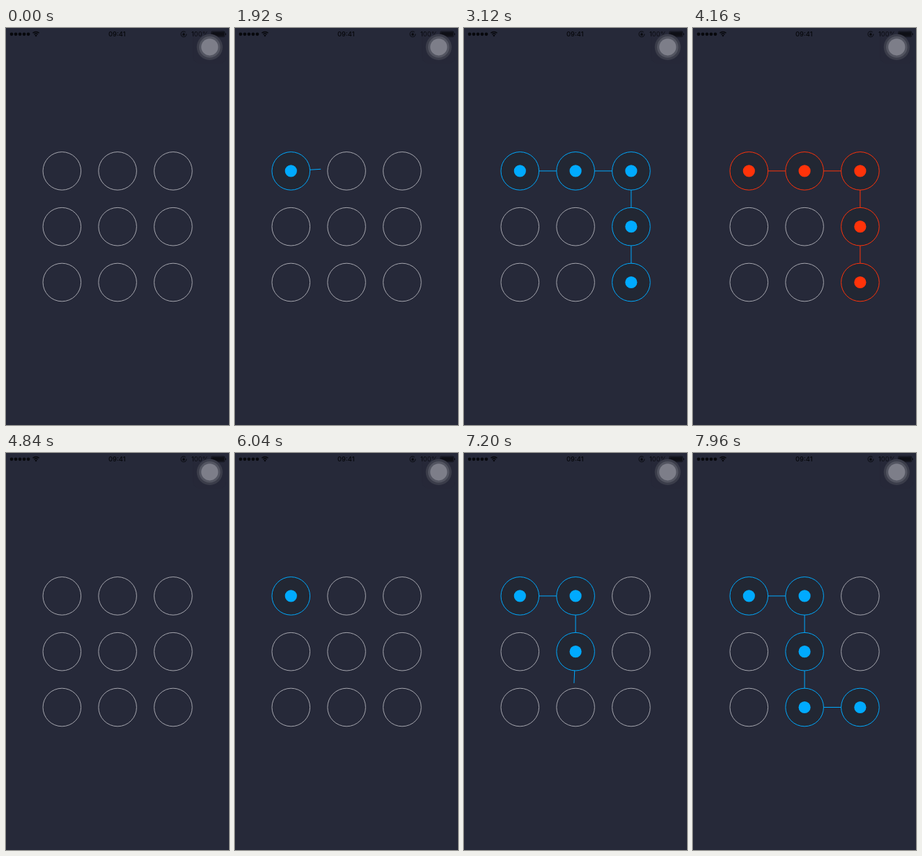
Animation of 320 by 569 pixels, one loop 8000 ms. Source, as an HTML page with a canvas:

```html
<!DOCTYPE html>
<html lang="en">
<head>
<meta charset="utf-8">
<title>Pattern lock</title>
<style>
  html, body { margin: 0; width: 100%; height: 100%; overflow: hidden; background: #262939; }
  canvas { display: block; width: 320px; height: 569px; }
</style>
</head>
<body>
<canvas id="stage"></canvas>
<script>
const W = 320, H = 569, LOOP = 8000, TICK = 40;
const STEP = 79.8, RADIUS = 27.3, BOW = 3.5;
const BG = '#262939', IDLE = '#a6a7af', BLUE = '#00aaff', RED = '#ff330a', FILL = '#222733', INK = '#07080c';
const RIGHT = 1, DOWN = 3;

const canvas = document.getElementById('stage');
const ctx = canvas.getContext('2d');
const dpr = window.devicePixelRatio || 1;
canvas.width = W * dpr;
canvas.height = H * dpr;

// Each gesture touches the first node, then makes eased strokes across `count` nodes.
const gestures = [
  {
    start: 1360, fail: 3400, end: 4760,
    strokes: [
      { at: 1693, ms: 667, dir: RIGHT, count: 2 },
      { at: 2370, ms: 840, dir: DOWN, count: 2 }
    ]
  },
  {
    start: 6040, fail: Infinity, end: LOOP,
    strokes: [
      { at: 6225, ms: 545, dir: RIGHT, count: 1 },
      { at: 6814, ms: 552, dir: DOWN, count: 2 },
      { at: 7548, ms: 545, dir: RIGHT, count: 1 }
    ]
  }
];

const node = i => [160.1 + STEP * (i % 3 - 1), 284.7 + STEP * (Math.floor(i / 3) - 1)];
const clamp = u => Math.min(1, Math.max(0, u));
const ease = u => u * u * (3 - 2 * u);

// Visited nodes and, while a stroke is under way, the slightly bowed finger position.
function trace(gesture, t) {
  const visited = [0];
  let from = 0, finger = null;
  for (const { at, ms, dir, count } of gesture.strokes) {
    if (t < at) break;
    const u = ease(clamp((t - at) / ms)), travel = u * count;
    for (let k = 1; k <= count; k++) {
      if (travel >= k - RADIUS / STEP) visited.push(from + k * dir);
    }
    const [x, y] = node(from), bow = BOW * Math.sin(Math.PI * u), move = travel * STEP;
    finger = u === 1 ? null : dir === RIGHT ? [x + move, y - bow] : [x - bow, y + move];
    from += count * dir;
  }
  return { visited, finger };
}

function disc(x, y, r, fill) {
  ctx.beginPath();
  ctx.arc(x, y, r, 0, 2 * Math.PI);
  ctx.fillStyle = fill;
  ctx.fill();
}

function arc(x, y, r, from, to, width, color) {
  ctx.beginPath();
  ctx.arc(x, y, r, from, to);
  ctx.lineWidth = width;
  ctx.strokeStyle = color;
  ctx.stroke();
}

function box(x, y, w, h, r, fill) {
  ctx.beginPath();
  ctx.roundRect(x, y, w, h, r);
  ctx.fillStyle = fill;
  ctx.fill();
}

function label(text, x, weight) {
  ctx.font = `${weight} 9.4px Inter, Roboto, sans-serif`;
  ctx.textAlign = 'center';
  ctx.textBaseline = 'middle';
  ctx.fillStyle = INK;
  ctx.fillText(text, x, 9.2);
}

function drawStatus() {
  for (let i = 0; i < 5; i++) disc(8 + 6 * i, 8.8, 2.4, INK);

  const up = -Math.PI / 2, spread = 0.76;
  for (const r of [3.8, 6.6]) arc(43, 12, r, up - spread, up + spread, 1.5, INK);
  ctx.beginPath();
  ctx.moveTo(43, 12.4);
  ctx.arc(43, 12.4, 2.4, up - spread, up + spread);
  ctx.fillStyle = INK;
  ctx.fill();

  label('09:41', 159.3, 500);

  arc(255, 8.8, 3.9, -0.1, 5.5, 0.9, INK);
  box(253.4, 8.2, 3.2, 2.6, 0.4, INK);
  arc(255, 8.2, 1.1, Math.PI, 2 * Math.PI, 0.7, INK);

  label('100%', 278.4, 400);

  ctx.beginPath();
  ctx.roundRect(294.5, 4.9, 19.4, 7.8, 1.6);
  ctx.lineWidth = 0.8;
  ctx.strokeStyle = INK;
  ctx.stroke();
  box(295.4, 5.8, 17.6, 6, 0.8, INK);
  box(314.6, 7.4, 1.2, 2.8, 0.6, INK);
}

function drawTouchButton() {
  box(268.5, 4, 47.5, 47, 9, 'rgba(36, 38, 52, 0.25)');
  disc(292.3, 27.3, 18.6, '#3b3d4a');
  disc(292.3, 27.3, 15.3, '#535561');
  disc(292.3, 27.3, 12.1, '#7d7e89');
}

function drawPattern(t) {
  const gesture = gestures.find(g => t >= g.start && t < g.end);
  const { visited, finger } = gesture ? trace(gesture, t) : { visited: [], finger: null };
  const color = gesture && t >= gesture.fail ? RED : BLUE;

  const points = visited.map(node);
  if (finger) points.push(finger);
  ctx.beginPath();
  points.forEach(p => ctx.lineTo(...p));
  ctx.lineWidth = 1;
  ctx.strokeStyle = color;
  ctx.stroke();

  for (let i = 0; i < 9; i++) {
    const [x, y] = node(i), on = visited.includes(i);
    if (on) disc(x, y, RADIUS, FILL);
    arc(x, y, RADIUS, 0, 2 * Math.PI, 1, on ? color : IDLE);
    if (on) disc(x, y, 8.6, color);
  }
}

function draw(t) {
  ctx.setTransform(dpr, 0, 0, dpr, 0, 0);
  ctx.fillStyle = BG;
  ctx.fillRect(0, 0, W, H);
  drawStatus();
  drawTouchButton();
  drawPattern(t);
}

const start = performance.now();

function frame() {
  const t = (performance.now() - start) % LOOP;
  draw(Math.floor(t / TICK) * TICK);
  requestAnimationFrame(frame);
}

frame();
</script>
</body>
</html>
```
